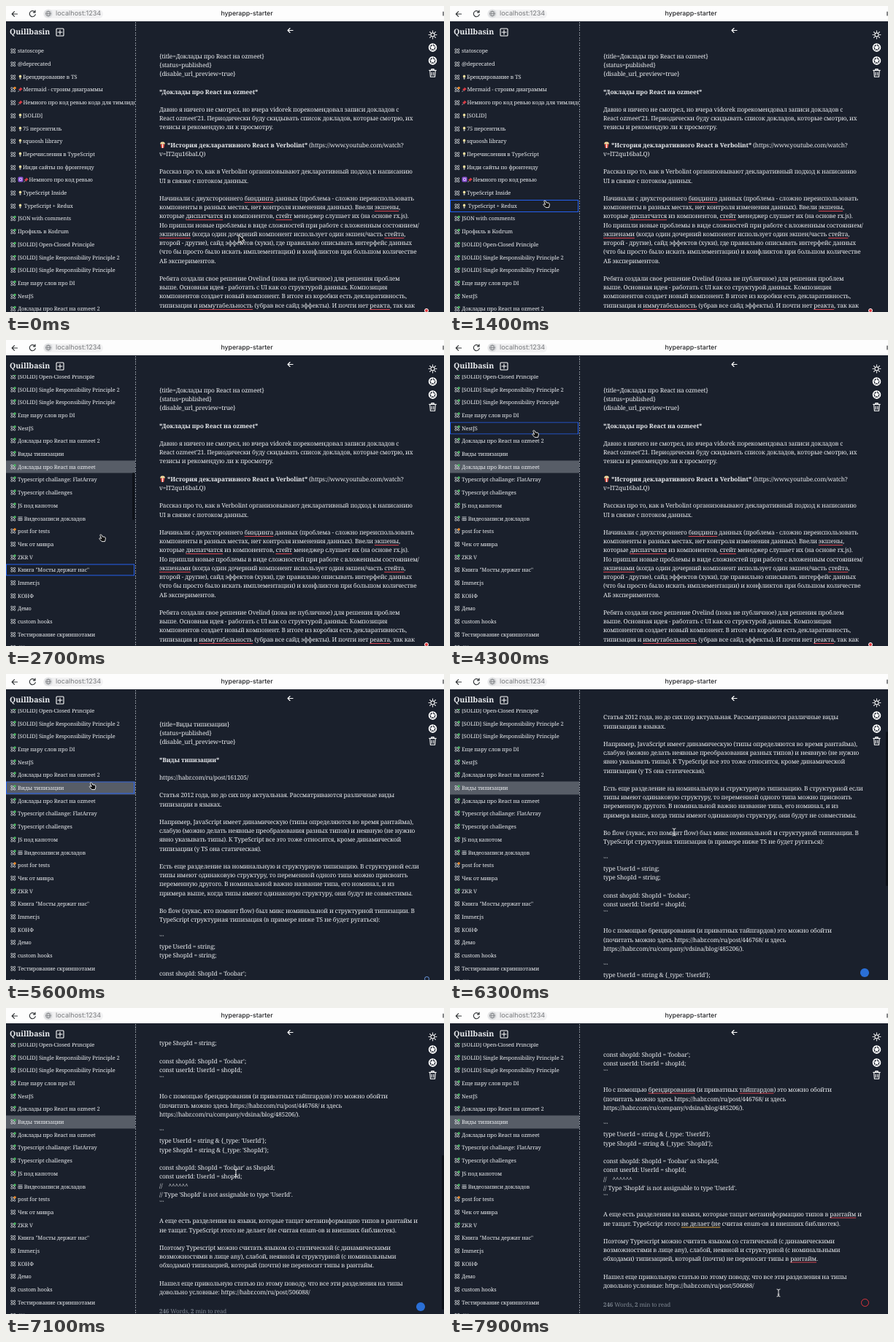
An HTML page for the animation above (8 s loop, 600 px wide and 420 px high).

```html
<!DOCTYPE html>
<html lang="ru">
<head>
<meta charset="utf-8">
<title>hyperapp-starter</title>
<style>
html, body { margin: 0; width: 100%; height: 100%; overflow: hidden; background: #1a202c; }
#stage {
  position: relative; width: 600px; height: 420px; overflow: hidden;
  background: #1a202c; color: #eceef1;
  font-family: "Noto Serif", serif; text-rendering: geometricPrecision; white-space: pre;
}
#stage div { position: absolute; }
#stage > svg { position: absolute; left: 0; top: 0; }
svg { overflow: visible; }
#bar { inset: 0 0 auto; height: 21.3px; background: #fdfdfd; font-family: Inter, sans-serif; line-height: 22px; }
#pill { left: 51px; top: 4.5px; width: 82px; height: 12.5px; border-radius: 7px; background: #f1f1f2; }
#host { left: 68px; top: 0; font-size: 9.1px; color: #77797c; }
#tab { left: 0; top: 0; width: 660px; text-align: center; font-size: 8.7px; font-weight: 500; color: #202124; }
#brand { left: 5px; top: 28px; font-size: 10.5px; font-weight: 700; line-height: 16px; }
#divider {
  left: 177px; top: 22px; width: 1px; height: 398px;
  background: repeating-linear-gradient(#8a9099 0 2px, transparent 2px 3.5px);
}
#side { left: 0; top: 48px; width: 177px; height: 372px; overflow: hidden; }
#list { top: 5.4px; width: 177px; }
.row { left: 0; width: 177px; height: 17.7px; font-size: 7.4px; letter-spacing: -.07px; line-height: 17.7px; overflow: hidden; }
.row.on { background: #575d67; }
.row.hover::after { content: ""; position: absolute; inset: .4px 1px .6px 0; border: 1.5px solid #2460f0; }
.row > svg { position: absolute; left: 5.5px; top: 5px; }
.row span { position: absolute; left: 16px; top: 1px; }
.row span svg { vertical-align: -1px; }
#view { left: 178px; top: 45px; width: 422px; height: 375px; overflow: hidden; }
.doc { left: 32px; top: .8px; font-size: 8.3px; letter-spacing: -.15px; line-height: 12.21px; }
.doc b { letter-spacing: -.04px; }
.doc svg { vertical-align: -1.5px; }
.doc u { text-decoration: underline 1px #d5434f; text-underline-offset: 2px; }
.doc u.warn { text-decoration-color: #dca23a; }
.doc.plain u { text-decoration: none; }
.foot { top: 703.5px; font-size: 8px; color: #7d858f; }
.thumb { width: 3px; border-radius: 2px; background: #0d1118; }
#badge { box-sizing: border-box; border-radius: 50%; }
</style>
</head>
<body>
<div id="stage">
  <div id="divider"></div>
  <div id="side"><div id="list"></div></div>
  <div id="brand">Quillbasin</div>
  <div id="view"></div>
  <div id="badge"></div>
  <div id="sideThumb" class="thumb" style="left:173px;height:65px"></div>
  <div id="viewThumb" class="thumb" style="left:597px;height:212px"></div>
  <div id="bar"><div id="pill"></div><div id="host">localhost:1234</div><div id="tab">hyperapp-starter</div></div>
  <svg id="chrome" width="600" height="420" fill="none" stroke-linecap="round" stroke-linejoin="round"></svg>
  <svg id="cursor" width="1" height="1" stroke-linejoin="round"></svg>
</div>
<script>
const $ = id => document.getElementById(id);
const svg = (size, body) =>
  `<svg width="${size}" height="${size}" viewBox="0 0 16 16" fill="none">${body}</svg>`;

const glyphs = {
  '💡': svg(7, '<path d="M6 10C2.500 7 4 1.500 8 1.500s5.500 5.500 2 8.500z" fill="#f6e3a0"/><path d="M6 11h4v4H6z" fill="#c9cdd3"/>'),
  '📌': svg(7.5, '<path d="M8 1l7 6-4 1-3 5-6-6 5-2z" fill="#dd3b45"/><path d="M5 10l-4 5" stroke="#c5c9cf" stroke-width="1.5"/>'),
  '🔮': svg(8, '<rect x="1" y="1" width="14" height="14" rx="3" fill="#8a4fd6"/><circle cx="8" cy="8" r="3.5" stroke="#eee" stroke-width="1.5"/>'),
  '📽': svg(7, '<path d="M1 3h14M2 7h12v7H2zM6 7v7M10 7v7" stroke="#d9dce0" stroke-width="1.6"/>'),
  '🍿': svg(9, '<path d="M3 6h10l-2 10H5z" fill="#e2483d"/><path d="M7 6h2v10H7z" fill="#fff"/><path d="M2 6c0-4 3-5 6-5s6 1 6 5z" fill="#f4dda0"/>')
};
const withGlyphs = s => s.replace(/💡|📌|🔮|📽|🍿/gu, g => glyphs[g]);

// Sidebar: a leading + marks a published post, ! a draft
const posts = `statoscope
@deprecated
💡Брендирование в TS
!📌Mermaid - строим диаграммы
📌Немного про код ревью кода для тимлидов
💡[SOLID]
💡75 персентиль
💡squoosh library
💡Перечисления в TypeScript
💡Инди сайты по фронтенду
🔮📌Немного про код ревью
💡TypeScript Inside
💡 TypeScript + Redux
+JSON with comments
+Профиль в Kodrum
+[SOLID] Open-Closed Principle
+[SOLID] Single Responsibility Principle 2
+[SOLID] Single Responsibility Principle
+Еще пару слов про DI
+NestJS
+Доклады про React на ozmeet 2
+Виды типизации
+Доклады про React на ozmeet
+Typescript challange: FlatArray
+Typescript challenges
+JS под капотом
+📽 Видеозаписи докладов
!post for tests
Чек от мивра
+ZKR V
Книга "Мосты держат нас"
Immer.js
КОНФ
Демо
custom hooks
Тестирование скриншотами
CV
Заметки
Черновик`.split('\n');

const talks = `{title=Доклады про React на ozmeet}
{status=published}
{disable_url_preview=true}

*Доклады про React на ozmeet*

Давно я ничего не смотрел, но вчера vidorek порекомендовал записи докладов с
React ozmeet'21. Периодически буду скидывать список докладов, которые смотрю, их
тезисы и рекомендую ли к просмотру.

🍿 *История декларативного React в Verbolint* (https://www.youtube.com/watch?
v=lT2qu16baLQ)

Рассказ про то, как в Verbolint организовывают декларативный подход к написанию
UI в связке с потоком данных.

Начинали с двухстороннего ~биндинга~ данных (проблема - сложно переиспользовать
компоненты в разных местах, нет контроля изменения данных). Ввели ~экшены~,
которые ~диспатчатся~ из компонентов, ~стейт~ менеджер слушает их (на основе rx.js).
Но пришли новые проблемы в виде сложностей при работе с вложенным состоянием/
~экшенами~ (когда один дочерний компонент использует один экшен/часть ~стейта~,
второй - другие), сайд эффектов (хуки), где правильно описывать интерфейс данных
(что бы просто было искать имплементации) и конфликтов при большом количестве
АБ экспериментов.

Ребята создали свое решение Ovelind (пока не публичное) для решения проблем
выше. Основная идея - работать с UI как со структурой данных. Композиция
компонентов создает новый компонент. В итоге из коробки есть декларативность,
типизация и ~иммутабельность~ (убрав все сайд эффекты). И почти нет ~реакта~, так как`;

const typing = `{title=Виды типизации}
{status=published}
{disable_url_preview=true}

*Виды типизации*

https://habr.com/ru/post/161205/

Статья 2012 года, но до сих пор актуальная. Рассматриваются различные виды
типизации в языках.

Например, JavaScript имеет динамическую (типы определяются во время рантайма),
слабую (можно делать неявные преобразования разных типов) и неявную (не нужно
явно указывать типы). К TypeScript все это тоже относится, кроме динамической
типизации (у TS она статическая).

Есть еще разделение на номинальную и структурную типизацию. В структурной если
типы имеют одинаковую структуру, то переменной одного типа можно присвоить
переменную другого. В номинальной важно название типа, его номинал, и из
примера выше, когда типы имеют одинаковую структуру, они будут не совместимы.

Во flow (лукас, кто помнит flow) был микс номинальной и структурной типизации. В
TypeScript структурная типизация (в примере ниже TS не будет ругаться):

\`\`\`
type UserId = string;
type ShopId = string;

const shopId: ShopId = 'foobar';
const userId: UserId = shopId;
\`\`\`

Но с помощью ~брендирования~ (и приватных ~тайпгардов~) это можно обойти
(почитать можно здесь https://habr.com/ru/post/446768/ и здесь
https://habr.com/ru/company/vdsina/blog/485206/).

\`\`\`
type UserId = string &amp; {_type: 'UserId'};
type ShopId = string &amp; {_type: 'ShopId'};

const shopId: ShopId = 'foobar' as ShopId;
const userId: UserId = shopId;
//    ^^^^^^
// Type 'ShopId' is not assignable to type 'UserId'.
\`\`\`

А еще есть разделения на языки, которые тащат метаинформацию типов в ~рантайм~ и
не тащат. TypeScript этого <u class="warn">не делает (не</u> считая enum-ов и внешних библиотек).

Поэтому Typescript можно считать языком со статической (с динамическими
возможностями в лице any), слабой, неявной и структурной (с номинальными
обходами) типизацией, который (почти) не переносит типы в ~рантайм~.

Нашел еще прикольную статью по этому поводу, что все эти разделения на типы
довольно условные: https://habr.com/ru/post/506088/`;

const PITCH = 17.7, LINE = 12.21;
const postIcon = mark => svg(7.5, `<g stroke="#f0f2f4" stroke-width="1.4">
  <ellipse cx="8" cy="8" rx="8.5" ry="3" transform="rotate(45 8 8)"/>
  <ellipse cx="8" cy="8" rx="8.5" ry="3" transform="rotate(-45 8 8)"/></g>` +
  (mark ? `<circle cx="13" cy="3" r="3.6" fill="${mark === '+' ? '#43b45c' : '#f08a24'}"/>` : ''));

$('list').innerHTML = posts.map((post, i) => {
  const [, mark, text] = post.match(/^([+!]?)(.*)$/u);
  return `<div class="row" style="top:${i * PITCH}px">${postIcon(mark)}<span>${withGlyphs(text)}</span></div>`;
}).join('');
const rows = [...$('list').children];

const docLine = (s, i) => `<div style="top:${17.9 + i * LINE}px">` +
  withGlyphs(s).replace(/\*(.+?)\*/g, '<b>*$1*</b>').replace(/~(.+?)~/g, '<u>$1</u>') + '</div>';
$('view').innerHTML = [talks, typing].map(text =>
  `<div class="doc">${text.split('\n').map(docLine).join('')}</div>`).join('');
const [talksDoc, typingDoc] = $('view').children;
typingDoc.insertAdjacentHTML('beforeend',
  '<div class="foot"><b>246</b> Words, <b>2</b> min to read</div>');

const spokes = (n, r0, r1) => Array.from({ length: n }, (_, i) => {
  const a = i * 2 * Math.PI / n - Math.PI / 2, x = Math.cos(a), y = Math.sin(a);
  return `M${x * r0} ${y * r0}L${x * r1} ${y * r1}`;
}).join('');
const ball = y => `<g transform="translate(584.5 ${y})"><circle r="5.2"/>
  <circle r="1.9" fill="#fff"/><path d="${spokes(5, 1.9, 5)}"/>
  <circle r="4.6" stroke-dasharray="2.4 3.38" stroke-width="1.6"/></g>`;

$('chrome').innerHTML = `
  <g stroke="#333639" stroke-width="1.2">
    <path d="M15.5 11H8.5M11.5 7.7L8.2 11l3.3 3.3"/>
    <path d="M39.4 8.2A4 4 0 1 0 40.2 11.6M40 6.2v2.6h-2.6"/>
    <path d="M599 8v5"/>
  </g>
  <circle cx="58" cy="10.5" r="6" fill="#e0e1e3"/>
  <g stroke="#808387" stroke-width=".8"><circle cx="58" cy="10.5" r="3.5"/>
    <ellipse cx="58" cy="10.5" rx="1.5" ry="3.5"/><path d="M54.5 10.5h7"/></g>
  <g stroke="#fff" stroke-width="1.1">
    <rect x="69" y="31" width="10" height="10" rx="1"/><path d="M74 33v6M71 36h6"/>
    <path d="M393 33.5h-7M389 30.5l-3 3 3 3"/>
    <g transform="translate(584.5 39.5)"><circle r="2.6"/><path d="${spokes(8, 4.2, 5.4)}"/></g>
    ${ball(57)}${ball(75)}
    <path d="M579.8 88.4h9.4M582.8 88v-1.4h3.4V88M580.8 89l.6 8.3h6.2l.6-8.3M583.2 91v4M585.8 91v4"/>
  </g>`;

const pointers = {
  arrow: '<path d="M-3-6v11l2.6-2.4 1.8 4 2-.9-1.8-3.8H5z" fill="#111" stroke="#fff" stroke-width=".9"/>',
  hand: '<path d="M-1.6-5C-2.6-5-2.8-4-2.4-3.2L-.9.6-2.2 0C-3.6-.5-4.2.6-3.2 1.5L-.4 4.6H4L4.8 1.4C5-.8 4.4-1.8 3-1.8L.8-2-.6-4.4Q-1-5-1.6-5z" fill="#111" stroke="#fff" stroke-width=".9"/>',
  beam: '<path d="M-2.4-5Q0-5 0-3.6Q0-5 2.4-5M0-4V4M-2.4 5Q0 5 0 3.6Q0 5 2.4 5M-1.3 2h2.6" fill="none" stroke="#e6e6e6"/>'
};

// Keyed tracks: [time, ...values], eased between keys
const mousePath = [[100, 322, 320], [900, 133, 242], [1200, 133, 242], [1300, 132, 254], [1400, 131.5, 272],
  [3300, 131.5, 272], [4250, 116.5, 129], [4400, 116.5, 129], [5000, 118, 154], [5650, 118, 154],
  [6300, 307, 217], [7000, 307, 217], [7700, 450, 391]];
const listScroll = [[1500, 0], [2300, 325], [2700, 277.5]];
const docScroll = [[6000, 0], [6600, 214], [7200, 347.5]];
const listThumb = [[1500, 0], [1600, 1], [2900, 1], [3200, 0]];
const docThumb = [[6000, 0], [6100, 1], [7400, 1], [7700, 0]];

function at(track, t) {
  const next = track.findIndex(key => key[0] > t);
  if (next < 1) return (next ? track[track.length - 1] : track[0]).slice(1);
  const a = track[next - 1], b = track[next];
  const k = (t - a[0]) / (b[0] - a[0]), e = k * k * (3 - 2 * k);
  return a.slice(1).map((v, i) => v + (b[i + 1] - v) * e);
}

// Hover stays on the last row passed until the mouse moves again
function hoveredRow(t) {
  const when = t < 3400 ? Math.min(t, 2300) : t;
  const [x, y] = at(mousePath, when);
  return x < 177 ? Math.floor((y - 5 - 53.4 + at(listScroll, when)[0]) / PITCH) : -1;
}

function setBadge(x, y, r, fill, border) {
  Object.assign($('badge').style, {
    left: x - r + 'px', top: y - r + 'px', width: 2 * r + 'px', height: 2 * r + 'px',
    background: fill, border
  });
}

function render(t) {
  const opened = t >= 5600;
  const [x, y] = at(mousePath, t), [listY] = at(listScroll, t), [docY] = at(docScroll, t);
  const hover = hoveredRow(t);

  $('list').style.transform = `translateY(${-listY}px)`;
  rows.forEach((row, i) => {
    row.classList.toggle('on', i === (opened ? 21 : 22));
    row.classList.toggle('hover', i === hover);
  });
  talksDoc.style.display = opened ? 'none' : '';
  typingDoc.style.display = opened ? '' : 'none';
  typingDoc.style.transform = `translateY(${-docY}px)`;
  typingDoc.classList.toggle('plain', t < 7500);

  $('sideThumb').style.top = 50 + (474 + listY) * .1757 + 'px';
  $('sideThumb').style.opacity = at(listThumb, t)[0];
  $('viewThumb').style.top = 22 + docY * .534 + 'px';
  $('viewThumb').style.opacity = at(docThumb, t)[0];

  if (!opened) setBadge(576, 418, 3, '#e0393e', '.8px solid #fff');
  else if (t < 6200) setBadge(576, 418.5, 3.5, 'none', '1.2px solid #6f9fe8');
  else if (t < 7400) setBadge(568, 410, 5.8, '#2a6fd6', 'none');
  else setBadge(568.5, 404.5, 5.8, 'none', '1.3px solid #e0343c');

  $('cursor').innerHTML = pointers[x < 177 ? 'hand' : t < 1000 ? 'arrow' : 'beam'];
  $('cursor').style.transform = `translate(${x}px, ${y}px)`;
}

const start = performance.now();
function tick() {
  const t = (performance.now() - start) % 8000;
  render(Math.floor(t / 100) * 100);
  requestAnimationFrame(tick);
}
tick();
</script>
</body>
</html>
```
